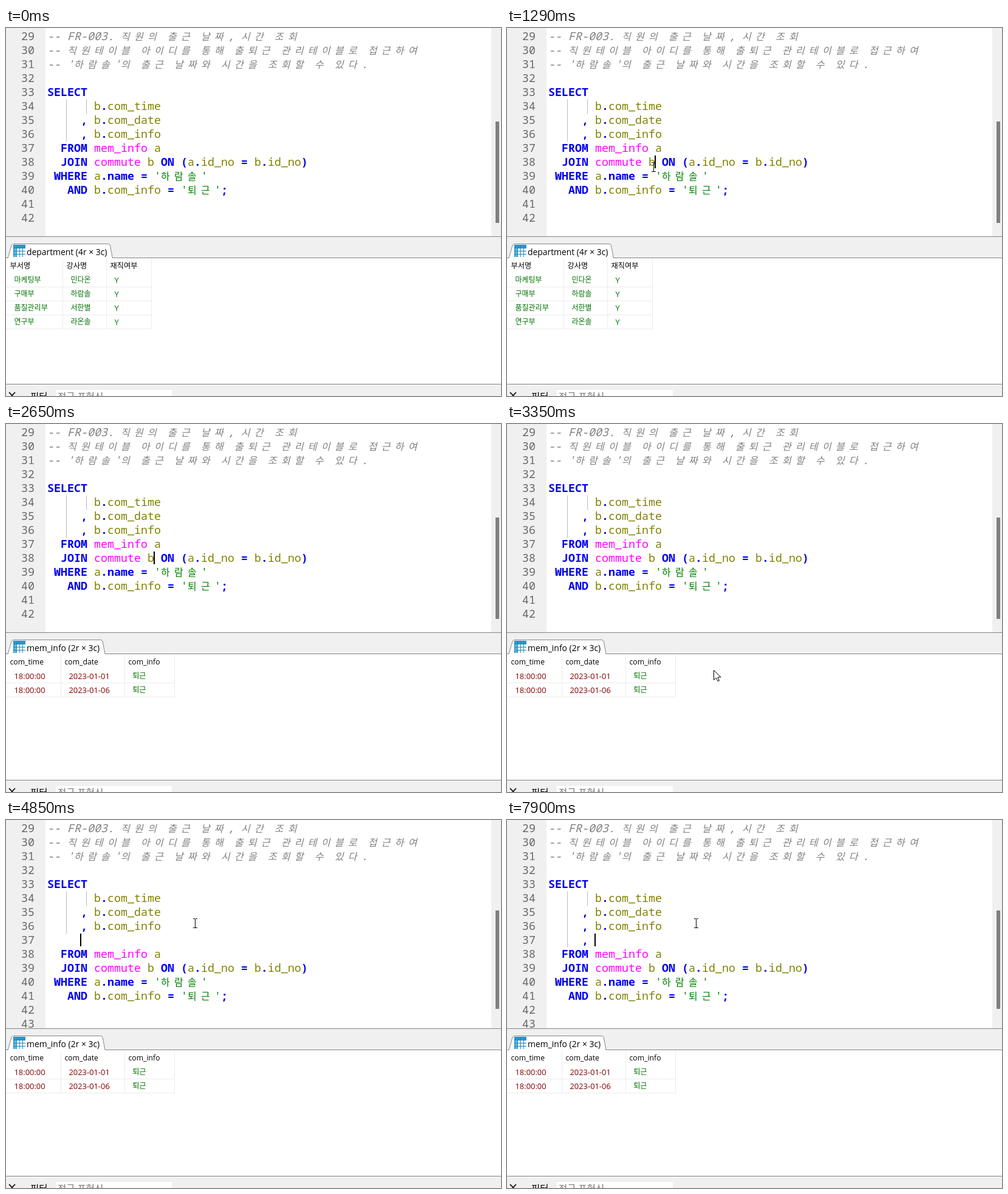
An HTML page with a canvas that plays this animation: 815x606 px, repeating every 8 s.

```html
<!DOCTYPE html>
<html lang="ko">
<head>
<meta charset="utf-8">
<style>
  html, body { margin: 0; height: 100%; overflow: hidden; background: #fff; }
  canvas { display: block; }
</style>
</head>
<body>
<canvas id="stage" width="815" height="606"></canvas>
<script>
const ctx = document.getElementById('stage').getContext('2d');
const LOOP = 8000, BLINK = 530, COL = 11, ROW = 23, LEFT = 68;
const QUERY_DONE = 1970, NEW_LINE = 4850;
const MONO = '18.33px "Noto Sans Mono", monospace';
const HANGUL = '16px "Noto Sans CJK KR", sans-serif';
const UI = '"Open Sans", "Noto Sans CJK KR", sans-serif';
const GRAY = '#858585', PANEL = '#f0f0f0', GRID = '#ececec';

const HEAD = `-- FR-003. 직원의 출근 날짜, 시간 조회
-- 직원테이블 아이디를 통해 출퇴근 관리테이블로 접근하여
-- '하람솔'의 출근 날짜와 시간을 조회할 수 있다.

SELECT
       b.com_time
     , b.com_date
     , b.com_info`.split('\n');
const TYPED = '     , b';
const TAIL = `  FROM mem_info a
  JOIN commute b ON (a.id_no = b.id_no)
 WHERE a.name = '하람솔'
   AND b.com_info = '퇴근';

`.split('\n');

const DEPARTMENTS = {
  title: 'department (4r × 3c)', edges: [0, 93, 165, 239],
  head: ['부서명', '강사명', '재직여부'],
  rows: [['마케팅부', '민다온', 'Y'], ['구매부', '하람솔', 'Y'],
         ['품질관리부', '서한별', 'Y'], ['연구부', '라온솔', 'Y']],
};
const COMMUTES = {
  title: 'mem_info (2r × 3c)', edges: [0, 90, 195, 277],
  head: ['com_time', 'com_date', 'com_info'],
  rows: ['01', '06'].map(day => ['18:00:00', `2023-01-${day}`, '퇴근']),
};

// Pointer glides through [time, x, y] and is hidden between the two runs.
const GLIDES = [
  [[190, 744, 580], [950, 241, 229], [1290, 241, 229], [2040, 271, 288], [2650, 130, 520]],
  [[2780, 14, 500], [3200, 345, 430], [3980, 291, 176], [4250, 311, 170], [LOOP, 311, 170]],
];

// Each [time, line, column] places the caret and restarts its blinking.
const CARET = [
  [1020, 38, 16], [2650, 38, 16], [3920, 36, 17], [NEW_LINE, 37, 5],
  [5380, 37, 6], [5580, 37, 7], [7500, 37, 8], [7900, 37, 7],
];

const baseline = line => 112 + (line - 33) * ROW;

function box(x, y, w, h, color) {
  ctx.fillStyle = color;
  ctx.fillRect(x, y, w, h);
}

function label(str, x, y, size, color) {
  ctx.font = `${size}px ${UI}`;
  ctx.fillStyle = color;
  ctx.fillText(str, x, y);
  return x + ctx.measureText(str).width;
}

// Hangul takes two columns of the code grid.
function cells(str, x, y, color, style = '') {
  ctx.fillStyle = color;
  for (const ch of str) {
    const wide = ch >= '가';
    ctx.font = `${style} ${wide ? HANGUL : MONO}`;
    ctx.fillText(ch, x, y);
    x += wide ? 2 * COL : COL;
  }
  return x;
}

function tokenStyle(token) {
  if (token[0] === "'") return ['#008000'];
  if (/^(mem_info|commute)$/.test(token)) return ['#ff00ff'];
  if (/^([A-Z]+|name|\W)$/.test(token)) return ['#0000f0', 'bold'];
  return ['#808000'];
}

function codeLine(str, line) {
  const y = baseline(line);
  cells(String(line), 25, y, '#686868');
  if (str.startsWith('--')) {
    cells(str, LEFT, y, '#808080', 'italic');
    return;
  }
  let x = LEFT;
  for (const token of str.match(/'[^']*'|\w+|\s+|./g) || [])
    x = cells(token, x, y, ...tokenStyle(token));
}

function guide(x, bottom) {
  for (let y = 118; y < bottom; y += 2) box(x, y, 1, 1, '#777');
}

function editor(t) {
  const [placed, line, col] = CARET.findLast(c => c[0] <= t) || [];
  const split = t >= NEW_LINE;
  box(0, 0, 65, 343, PANEL);
  box(799, 0, 16, 343, PANEL);
  box(806, split ? 149 : 154, 6, split ? 162 : 167, '#808080');
  guide(99, split && col > 5 ? 210 : 187);
  guide(132, 141);

  const lines = split ? [...HEAD, TYPED.slice(0, col), ...TAIL] : [...HEAD, ...TAIL];
  lines.forEach((str, i) => codeLine(str, 29 + i));

  const lit = Math.floor((t - placed) / BLINK) % 2 === 0;
  if (lit) box(LEFT + col * COL - 1, baseline(line) - 17, 2, 21, '#000');
}

function tableIcon(x, y) {
  box(x, y, 20, 20, '#2386b4');
  for (let r = 0; r < 4; r++)
    for (let c = 0; c < 4; c++)
      box(x + 1 + c * 5, y + 1 + r * 5, 4, 4, !r ? '#2999cf' : !c ? '#55bae5' : '#fff');
}

function tab(title) {
  ctx.font = `13.9px ${UI}`;
  const right = 34 + ctx.measureText(title).width + 9;
  ctx.beginPath();
  ctx.moveTo(3, 379);
  ctx.lineTo(9, 358);
  ctx.quadraticCurveTo(10, 355.5, 13, 355.5);
  ctx.lineTo(right - 7, 355.5);
  ctx.quadraticCurveTo(right - 5, 355.5, right - 4, 358);
  ctx.lineTo(right, 379);
  ctx.fillStyle = '#fff';
  ctx.fill();
  ctx.strokeStyle = GRAY;
  ctx.lineWidth = 1;
  ctx.stroke();
  tableIcon(12, 357);
  label(title, 34, 374, 13.9, '#000');
}

function results({ title, edges, head, rows }) {
  box(0, 343, 815, 263, '#fff');
  box(0, 343, 815, 36, PANEL);
  box(0, 343, 815, 1, GRAY);
  box(0, 378, 815, 1, GRAY);
  tab(title);

  const [, ...rules] = edges;
  rules.forEach(x => box(x, 380, 1, 23 + rows.length * ROW, GRID));
  head.forEach((str, c) => label(str, edges[c] + 6.5, 396, 12.2, '#000'));
  rows.forEach((row, r) => {
    box(0, 426 + r * ROW, edges[3] + 1, 1, GRID);
    row.forEach((str, c) => {
      const hangul = str >= '가', number = /^\d/.test(str);
      label(str, edges[c] + 13.5, (hangul ? 419 : 420) + r * ROW,
        hangul ? 12 : 12.9, number ? '#800000' : '#007000');
    });
  });
}

function filterBar() {
  box(0, 586, 815, 20, PANEL);
  box(0, 586, 815, 1, GRAY);
  box(82, 596, 191, 10, '#fff');
  ctx.strokeStyle = '#222';
  ctx.lineWidth = 1.8;
  ctx.stroke(new Path2D('M5 600l10 10m0 -10l-10 10'));
  label('필터', 40, 613, 15.5, '#000');
  label('정규 표현식', 85, 613, 15.5, '#777');
}

function pointerAt(t) {
  const run = GLIDES.find(g => t >= g[0][0] && t < g.at(-1)[0]);
  if (!run) return null;
  const i = run.findIndex(p => p[0] > t);
  const [t0, x0, y0] = run[i - 1], [t1, x1, y1] = run[i];
  const k = (t - t0) / (t1 - t0), ease = k * k * (3 - 2 * k);
  return [x0 + (x1 - x0) * ease, y0 + (y1 - y0) * ease].map(Math.round);
}

function pointer(x, y) {
  if (y < 343) {
    box(x, y - 7, 1, 15, '#000');
    for (const edge of [y - 8, y + 7]) {
      box(x - 3, edge, 3, 1, '#000');
      box(x + 1, edge, 3, 1, '#000');
    }
    return;
  }
  const arrow = new Path2D('M.5 .5V16.5L4.5 13L7 18.5L9.5 17.5L7 12H12Z');
  ctx.save();
  ctx.translate(x, y);
  ctx.fillStyle = '#fff';
  ctx.strokeStyle = '#000';
  ctx.lineWidth = 1;
  ctx.fill(arrow);
  ctx.stroke(arrow);
  ctx.restore();
}

function draw(t) {
  box(0, 0, 815, 606, '#fff');
  editor(t);
  results(t < QUERY_DONE ? DEPARTMENTS : COMMUTES);
  filterBar();
  const at = pointerAt(t);
  if (at) pointer(...at);
}

const start = performance.now();
function tick() {
  draw((performance.now() - start) % LOOP);
  requestAnimationFrame(tick);
}
tick();
</script>
</body>
</html>
```
